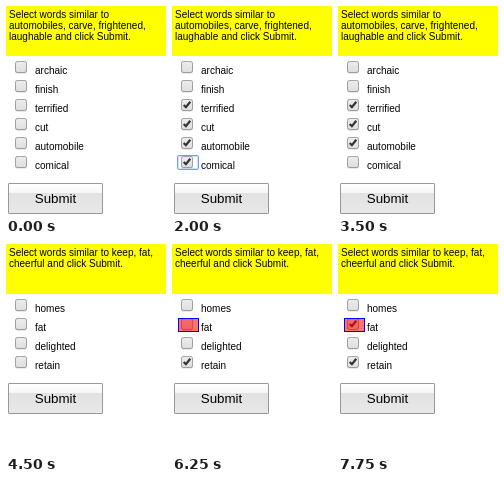
An HTML page for the animation above (8 s loop, 160 px wide and 210 px high).

```html
<!DOCTYPE html>
<html lang="en">
<head>
<meta charset="utf-8">
<title>Similar words</title>
<style>
  html, body { margin: 0; width: 100%; height: 100%; overflow: hidden; background: #fff; }
  #stage {
    position: relative; width: 160px; height: 210px; overflow: hidden;
    font: 10px/11px "Liberation Sans", Arial, sans-serif; color: #000;
  }
  .scene { position: absolute; inset: 0; visibility: hidden; }
  .scene.on { visibility: visible; }
  .query {
    position: absolute; left: 0; top: 0; width: 160px; height: 50px;
    box-sizing: border-box; padding: 3px; background: #ff0; white-space: pre;
  }
  .row { position: absolute; left: 0; width: 160px; height: 19px; }
  .row span { position: absolute; left: 29px; top: 6px; white-space: nowrap; }
  .row svg { position: absolute; left: 0; top: 0; overflow: visible; }
  .tick, .ring, .mark { visibility: hidden; }
  .on .checked .tick, .on .focused .ring, .on .marked .mark { visibility: visible; }
  .submit {
    position: absolute; left: 2px; width: 95px; height: 31px; box-sizing: border-box;
    border: 1px solid #999; border-radius: 1px;
    background: linear-gradient(#fff, #f6f6f6 30%, #e2e2e2 30%, #e8e8e8);
    font-size: 13.333px; line-height: 29px; text-align: center;
  }
</style>
</head>
<body>
<div id="stage"></div>
<svg width="0" height="0" style="position:absolute">
  <linearGradient id="face" x1="0" y1="0" x2="0" y2="1">
    <stop offset="0" stop-color="#ededed"/>
    <stop offset="1" stop-color="#dedede"/>
  </linearGradient>
</svg>
<script>
const LOOP = 8000, STEP = 250, ROW = 19, TOP = 53;

// clicks: row to toggle; rings: indexes of clicks that leave a focus ring
const scenes = [
  {
    start: 0, last: 14,
    query: "Select words similar to\nautomobiles, carve, frightened,\nlaughable and click Submit.",
    words: ["archaic", "finish", "terrified", "cut", "automobile", "comical"],
    clicks: [4, 3, 2, 5, 5, 5, 5], rings: [3, 5]
  },
  {
    start: 4500, last: 13,
    query: "Select words similar to keep, fat,\ncheerful and click Submit.",
    words: ["homes", "fat", "delighted", "retain"],
    clicks: [3, 1, 1, 1, 1, 1, 1], rings: [1, 3]
  }
];

const checkbox = `<svg width="28" height="19">
  <rect x="9" y="3" width="12" height="12" rx="2" fill="#000" fill-opacity=".08"/>
  <rect x="9" y="2" width="12" height="12" rx="2" fill="url(#face)"/>
  <rect x="9.5" y="2.5" width="11" height="11" rx="2" fill="none" stroke="#000" stroke-opacity=".3"/>
  <path class="tick" d="M11.7 8L13.9 10.2L18.3 4.7" fill="none" stroke="#333" stroke-width="2.2"/>
  <g class="ring" fill="none" stroke="#4d90fe">
    <rect x="5.5" y="1.5" width="21" height="14" rx="1.5" stroke-opacity=".85"/>
    <rect x="6.5" y="2.5" width="19" height="12" rx="1" stroke-opacity=".25"/>
  </g>
  <rect class="mark" x="6.5" y="2.5" width="20" height="13" fill="#f00" fill-opacity=".55" stroke="#00f"/>
</svg>`;

function add(parent, className, text = "") {
  const el = document.createElement("div");
  el.className = className;
  el.textContent = text;
  return parent.appendChild(el);
}

for (const scene of scenes) {
  scene.el = add(document.getElementById("stage"), "scene");
  add(scene.el, "query", scene.query);
  scene.rows = scene.words.map((word, i) => {
    const row = add(scene.el, "row");
    row.style.top = TOP + i * ROW + "px";
    row.innerHTML = `${checkbox}<span>${word}</span>`;
    return row;
  });
  add(scene.el, "submit", "Submit").style.top = 63 + scene.words.length * ROW + "px";
}

// Each click takes two steps: highlight the box, then toggle it.
function draw(now) {
  const t = now % LOOP;
  const current = t < scenes[1].start ? scenes[0] : scenes[1];
  for (const scene of scenes) scene.el.classList.toggle("on", scene === current);

  const { start, last, clicks, rings, rows } = current;
  const step = Math.min(Math.floor((t - start) / STEP), last);
  const done = step >> 1;
  const marking = step % 2 === 1;
  rows.forEach((row, i) => {
    const hits = clicks.slice(0, done).filter(r => r === i).length;
    row.classList.toggle("checked", hits % 2 === 1);
    row.classList.toggle("marked", marking && clicks[done] === i);
    row.classList.toggle("focused", !marking && rings.includes(done - 1) && clicks[done - 1] === i);
  });
}

const origin = performance.now();
function tick() {
  draw(performance.now() - origin);
  requestAnimationFrame(tick);
}
tick();
</script>
</body>
</html>
```
